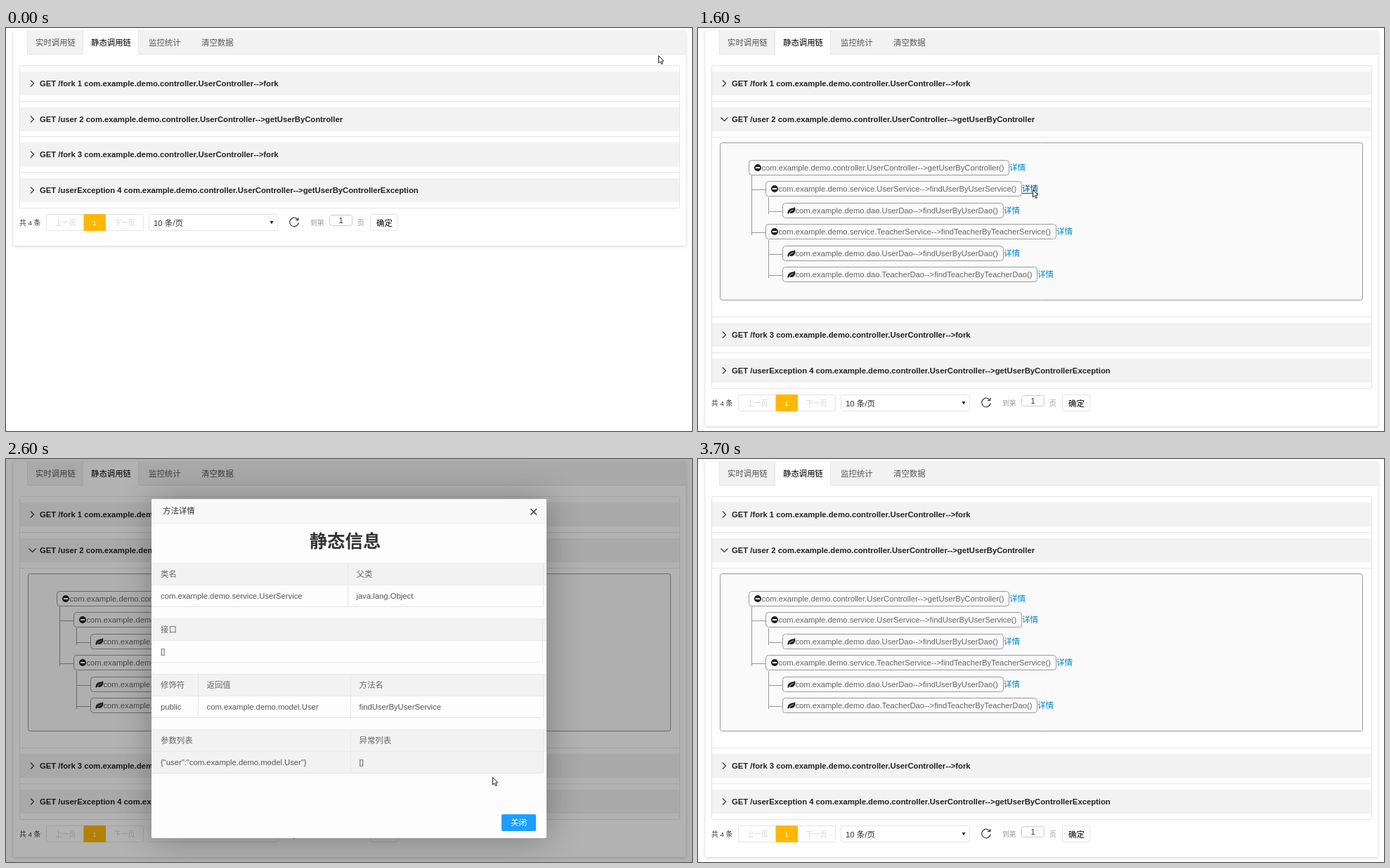
These frames come from a looping animation (976 by 574 pixels, 4 s). An HTML page with a canvas:

```html
<!DOCTYPE html>
<html lang="zh-CN">
<head>
<meta charset="utf-8">
<title>静态调用链</title>
<style>
html, body { margin: 0; width: 100%; height: 100%; overflow: hidden; background: #fefefe; }
canvas { display: block; }
</style>
</head>
<body>
<canvas id="stage" width="976" height="574"></canvas>
<script>
const W = 976, H = 574, LOOP = 4000, STEP = 100;
const OPEN_ROW = 1000, SHADE_ON = 1700, SHADE_OFF = 3100;
const FONT = '"Liberation Sans", "Noto Sans CJK SC", "Noto Sans CJK", sans-serif';
const LINE = '#e6e6e6', PALE = '#f2f2f2', PAPER = '#fefefe';

const stage = document.getElementById('stage').getContext('2d');
const layer = Object.assign(document.createElement('canvas'), { width: W, height: H }).getContext('2d');
let g = stage;

function text(s, x, y, { size = 11.4, color = '#333', weight = 'normal', align = 'left' } = {}) {
  g.font = `${weight} ${size}px ${FONT}`;
  g.fillStyle = color;
  g.textAlign = align;
  g.fillText(s, x, y);
}

function fill(x, y, w, h, color, r = 0) {
  g.fillStyle = color;
  g.beginPath();
  g.roundRect(x, y, w, h, r);
  g.fill();
}

function box(x, y, w, h, color, r = 0) {
  g.strokeStyle = color;
  g.lineWidth = 1;
  g.beginPath();
  g.roundRect(x + 0.5, y + 0.5, w - 1, h - 1, r);
  g.stroke();
}

function path(points, color, width = 1) {
  g.strokeStyle = color;
  g.lineWidth = width;
  g.beginPath();
  points.forEach(([x, y]) => g.lineTo(x, y));
  g.stroke();
}

const hline = (x1, x2, y, c = LINE) => fill(x1, y, x2 - x1, 1, c);
const vline = (x, y1, y2, c = LINE) => fill(x, y1, 1, y2 - y1, c);

// Page

function drawTabs() {
  fill(31, 4, 936, 33, PALE);
  hline(31, 967, 37);
  fill(110, 4, 78, 34, PAPER);
  [30, 109, 188].forEach(x => vline(x, 4, 38));
  text('实时调用链', 42, 24.5, { color: '#555' });
  text('静态调用链', 121, 24.5, { color: '#000', weight: 500 });
  text('监控统计', 203, 24.5, { color: '#555' });
  text('清空数据', 278, 24.5, { color: '#555' });
}

const USER = 'com.example.demo.controller.UserController-->';
const ROWS = [
  'GET /fork 1 ' + USER + 'fork',
  'GET /user 2 ' + USER + 'getUserByController',
  'GET /fork 3 ' + USER + 'fork',
  'GET /userException 4 ' + USER + 'getUserByControllerException'
];

function drawRows(open, shift) {
  box(19, 53, 940, 204 + shift, LINE, 2);
  ROWS.forEach((label, i) => {
    const y = Math.round(62 + 50.6 * i) + (i > 1 ? shift : 0);
    if (i) hline(20, 958, y - 9);
    fill(20, y, 938, 34, PALE);
    const c = y + 17;
    path(open && i === 1
      ? [[32.5, c - 2.5], [37.5, c + 2.5], [42.5, c - 2.5]]
      : [[35, c - 4.5], [39.5, c], [35, c + 4.5]], '#333', 1.2);
    text(label, 48, c + 4, { size: 11.27, weight: 'bold', color: '#222' });
  });
}

// depth, right edge, call
const NODES = [
  [0, 443, USER + 'getUserByController()'],
  [1, 461, 'com.example.demo.service.UserService-->findUserByUserService()'],
  [2, 435, 'com.example.demo.dao.UserDao-->findUserByUserDao()'],
  [1, 510, 'com.example.demo.service.TeacherService-->findTeacherByTeacherService()'],
  [2, 435, 'com.example.demo.dao.UserDao-->findUserByUserDao()'],
  [2, 483, 'com.example.demo.dao.TeacherDao-->findTeacherByTeacherDao()']
];

function minusIcon(x, y) {
  fill(x - 5, y - 5, 10, 10, '#222', 5);
  fill(x - 3, y - 1, 6, 2, '#fff');
}

function leafIcon(x, y) {
  g.fillStyle = '#222';
  g.beginPath();
  g.moveTo(x + 5, y - 5);
  g.bezierCurveTo(x + 7, y + 2, x + 1, y + 6, x - 3, y + 3);
  g.lineTo(x - 4.5, y + 5);
  g.lineTo(x - 5.5, y + 4);
  g.bezierCurveTo(x - 5, y - 5, x + 2, y - 2, x + 5, y - 5);
  g.fill();
  path([[x - 3, y + 2.5], [x, y], [x + 2.5, y - 1]], '#fafafa', 0.8);
}

function drawLink(x, y, [px, py]) {
  const hover = px >= x && px < x + 23 && Math.abs(py - y) < 8;
  const color = hover ? '#005580' : '#08c';
  text('详情', x, y + 4.3, { size: 11.6, color });
  if (hover) hline(x, x + 23, y + 6, color);
}

function drawTree(pointer) {
  hline(20, 958, 155);
  fill(31, 163, 915, 225, '#fafafa', 3);
  box(31, 163, 915, 225, '#999', 3);
  vline(76, 210, 295, '#999');
  vline(100, 241, 265, '#999');
  vline(100, 302, 356, '#999');
  NODES.forEach(([depth, right, call], i) => {
    const x = 72 + 24 * depth, y = Math.round(199 + 30.45 * i);
    if (depth) hline(x - 20, x, y + 1, '#999');
    box(x, y - 11, right - x, 22, '#999', 4);
    (depth < 2 ? minusIcon : leafIcon)(x + 13, y);
    text(call, x + 18.5, y + 4, { size: 11.24, color: '#666' });
    drawLink(right, y, pointer);
  });
}

function refreshIcon(x, y) {
  g.strokeStyle = '#333';
  g.lineWidth = 1.2;
  g.beginPath();
  g.arc(x, y, 6.3, 0.15, Math.PI * 2 - 0.65);
  g.stroke();
  path([[x + 6, y - 6.5], [x + 5.6, y - 3], [x + 2, y - 3.2]], '#333', 1.2);
}

function drawPager(dy) {
  const small = 9.75;
  g.save();
  g.translate(0, dy);
  text('共 4 条', 19, 281, { size: small });
  box(57, 265, 139, 24, LINE, 2);
  text('上一页', 70, 281, { size: small, color: '#d2d2d2' });
  fill(110.5, 265, 31.5, 24, '#ffb800');
  text('1', 126, 281, { size: small, color: '#fff', align: 'center' });
  text('下一页', 154, 281, { size: small, color: '#d2d2d2' });
  box(203, 265, 184, 24, LINE, 2);
  text('10 条/页', 210, 281.5);
  g.fillStyle = '#222';
  g.beginPath();
  g.moveTo(375.5, 275);
  g.lineTo(380.5, 275);
  g.lineTo(378, 279.5);
  g.fill();
  refreshIcon(410, 276.5);
  text('到第', 433, 281, { size: small, color: '#999' });
  box(460, 266, 33, 16, '#ccc', 3);
  text('1', 476.5, 277.5, { align: 'center', size: 11 });
  text('页', 500, 281, { size: small, color: '#999' });
  box(518, 265, 40, 24, LINE, 2);
  text('确定', 527, 281.5, { color: '#000' });
  g.restore();
}

function drawPage(open, pointer) {
  const shift = open ? 257 : 0;
  fill(0, 0, W, H, PAPER);
  g.save();
  g.shadowColor = 'rgba(0,0,0,.18)';
  g.shadowBlur = 4;
  g.shadowOffsetY = 1;
  fill(10.5, 4, 957, 306 + shift, PAPER, 2);
  g.restore();
  drawTabs();
  drawRows(open, shift);
  if (open) drawTree(pointer);
  drawPager(shift);
}

// Dialog

const TABLES = [
  { y: 148, cols: [207, 486, 764], head: ['类名', '父类'], row: ['com.example.demo.service.UserService', 'java.lang.Object'] },
  { y: 227, cols: [207, 763], head: ['接口'], row: ['[]'] },
  { y: 306, cols: [207, 273, 490, 764], head: ['修饰符', '返回值', '方法名'], row: ['public', 'com.example.demo.model.User', 'findUserByUserService'] },
  { y: 385, cols: [207, 490, 764], head: ['参数列表', '异常列表'], row: ['{"user":"com.example.demo.model.User"}', '[]'] }
];

function drawTable({ y, cols, head, row }, hoverY) {
  const end = cols[cols.length - 1];
  fill(207, y, 562, 31, PALE);
  if (hoverY > y + 31 && hoverY < y + 62) fill(207, y + 31, end - 207, 31, PALE);
  hline(207, 769, y, '#ebebeb');
  hline(207, 769, y + 31, '#ebebeb');
  hline(207, end, y + 62);
  cols.slice(1).forEach(x => vline(x, y, y + 62));
  head.forEach((s, i) => {
    const x = cols[i] + (i ? 12.5 : 13);
    text(s, x, y + 20, { color: '#666' });
    text(row[i], x, y + 50.5, { size: 11.28, color: '#555' });
  });
}

function drawDialog(scale, alpha, hoverY) {
  g = layer;
  g.clearRect(0, 0, W, H);
  g.save();
  g.translate(488, 298.5);
  g.scale(scale, scale);
  g.translate(-488, -298.5);
  g.save();
  g.shadowColor = 'rgba(0,0,0,.3)';
  g.shadowBlur = 50 * scale;
  g.shadowOffsetX = g.shadowOffsetY = 1;
  fill(207, 57, 562, 483, '#fdfdfd', 2);
  g.restore();
  fill(207, 57, 562, 34, '#f8f8f8', [2, 2, 0, 0]);
  hline(207, 769, 91, '#eee');
  text('方法详情', 223, 78.3);
  path([[746.5, 71], [755, 79.5]], '#333', 1.4);
  path([[755, 71], [746.5, 79.5]], '#333', 1.4);
  text('静态信息', 482.5, 125.8, { size: 25.4, weight: 'bold', align: 'center' });
  TABLES.forEach(t => drawTable(t, hoverY));
  fill(705, 506, 49, 24, '#1e9fff', 2);
  text('关闭', 729.5, 522.3, { color: '#fff', align: 'center', size: 11.6 });
  g.restore();
  g = stage;
  g.globalAlpha = alpha;
  g.drawImage(layer.canvas, 0, 0);
  g.globalAlpha = 1;
}

// Motion

// CSS "ease": cubic-bezier(.25, .1, .25, 1)
function ease(x) {
  if (x <= 0) return 0;
  if (x >= 1) return 1;
  const curve = (s, a, b) => 3 * (1 - s) ** 2 * s * a + 3 * (1 - s) * s * s * b + s ** 3;
  let lo = 0, hi = 1;
  for (let i = 0; i < 20; i++) {
    const mid = (lo + hi) / 2;
    if (curve(mid, 0.25, 0.25) < x) lo = mid; else hi = mid;
  }
  return curve(lo, 0.1, 1);
}

const mix = (a, b, p) => a + (b - a) * p;

function dialogPose(t) {
  if (t < 3068) {
    const p = ease((t - 1624) / 270);
    return [mix(0.5, 1, p), p];
  }
  const p = (t - 3068) / 200;
  const scale = p < 0.3
    ? mix(1, 1.05, ease(p / 0.3))
    : mix(1.05, 0.7, ease((p - 0.3) / 0.7));
  return [scale, 1 - ease(p)];
}

// time, x, y
const POINTER = [
  [0, 928, 39], [100, 800, 57], [200, 688, 80], [300, 636, 101], [400, 525, 133],
  [600, 525, 133], [800, 529, 147], [1000, 516, 203], [1200, 485, 224], [1300, 476, 233],
  [1500, 476, 233], [1600, 476, 230], [1800, 476, 230], [1900, 440, 237],
  [2100, 260, 257], [2200, 226, 274], [2300, 245, 345], [2400, 330, 405],
  [2500, 540, 430], [2600, 692, 453], [2700, 721, 497], [2800, 729, 513],
  [2900, 731, 514], [3000, 738, 500], [3100, 772, 421], [3200, 880, 228],
  [3300, 937, 140], [3600, 969, 52], [3700, 990, 30], [LOOP, 990, 30]
];

function pointerAt(t) {
  const i = POINTER.findIndex(k => k[0] > t);
  const [t0, x0, y0] = POINTER[i - 1], [t1, x1, y1] = POINTER[i];
  const p = (t - t0) / (t1 - t0);
  return [mix(x0, x1, p), mix(y0, y1, p)];
}

function drawPointer([x, y]) {
  g.save();
  g.translate(Math.round(x) + 0.5, Math.round(y) + 0.5);
  g.beginPath();
  [[0, 0], [0, 10.5], [2.4, 8.3], [4.2, 12], [5.8, 11.3], [4.2, 7.7], [7.3, 7.5]]
    .forEach(p => g.lineTo(...p));
  g.closePath();
  g.fillStyle = '#fff';
  g.fill();
  g.strokeStyle = '#222';
  g.lineWidth = 1;
  g.stroke();
  g.restore();
}

function draw(t) {
  const pointer = pointerAt(t);
  const shaded = t >= SHADE_ON && t < SHADE_OFF;
  drawPage(t >= OPEN_ROW, shaded ? [-1, -1] : pointer);
  if (shaded) fill(0, 0, W, H, 'rgba(0,0,0,.3)');
  const [scale, alpha] = dialogPose(t);
  if (alpha > 0) {
    // row highlight trails the pointer by one step
    const hoverY = t > 2000 && t < 2800 ? pointerAt(t - STEP)[1] : 0;
    drawDialog(scale, alpha, hoverY);
  }
  drawPointer(pointer);
}

const start = performance.now();
let last = -1;

function tick() {
  const t = Math.floor((performance.now() - start) % LOOP / STEP) * STEP;
  if (t !== last) draw(last = t);
  requestAnimationFrame(tick);
}
tick();
</script>
</body>
</html>
```
